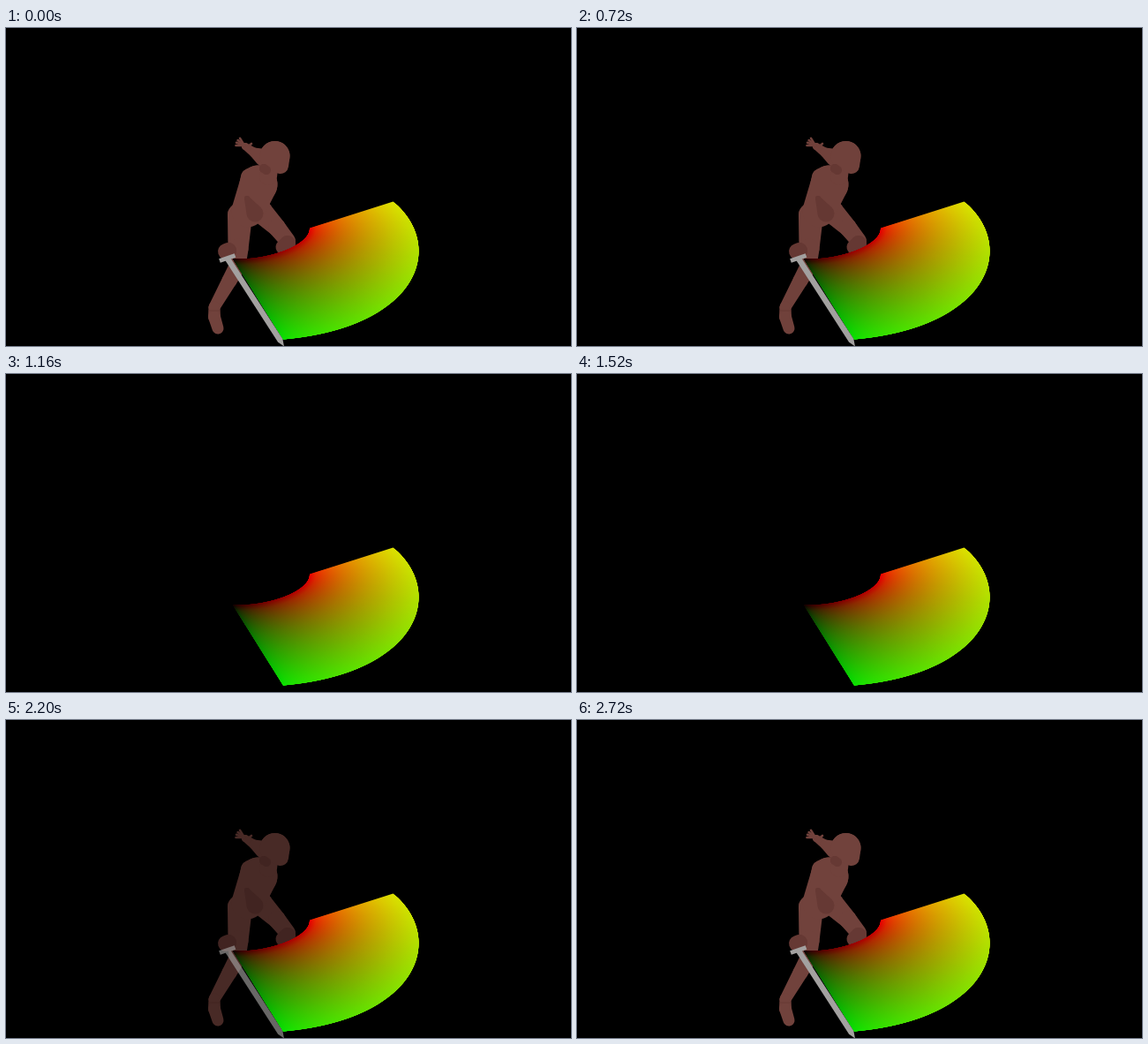
An HTML page with a canvas that plays this animation: 640 by 360 pixels, repeating every 2.76 s.

```html
<!DOCTYPE html>
<html>
<head>
<meta charset="utf-8">
<style>
html, body { margin: 0; width: 100%; height: 100%; overflow: hidden; background: #000; }
canvas { display: block; }
</style>
</head>
<body>
<canvas id="stage" width="640" height="360"></canvas>
<script>
const W = 640, H = 360, LOOP = 2760, FADE = 440;
const SKIN = '#71423c', SHADE = '#663934', STEEL = '#a3a1a0';
const ctx = document.getElementById('stage').getContext('2d');

function layer(paint) {
  const canvas = document.createElement('canvas');
  canvas.width = W;
  canvas.height = H;
  paint(canvas.getContext('2d'));
  return canvas;
}

function polygon(g, color, points) {
  g.fillStyle = color;
  g.beginPath();
  points.forEach(([x, y]) => g.lineTo(x, y));
  g.closePath();
  g.fill();
}

function line(g, color, width, from, to, cap = 'round') {
  g.strokeStyle = color;
  g.lineWidth = width;
  g.lineCap = cap;
  g.beginPath();
  g.moveTo(...from);
  g.lineTo(...to);
  g.stroke();
}

// Tapered tube through joints given as [x, y, radius].
function limb(g, color, ...joints) {
  g.fillStyle = color;
  joints.forEach(([x, y, r], i) => {
    const [px, py, pr] = joints[Math.max(0, i - 1)];
    const axis = Math.atan2(y - py, x - px);
    const spread = Math.acos((pr - r) / (Math.hypot(x - px, y - py) || 1));
    g.beginPath();
    g.arc(px, py, pr, axis + spread, axis - spread + 2 * Math.PI);
    g.arc(x, y, r, axis - spread, axis + spread);
    g.fill();
  });
}

function paintBody(g) {
  // Legs
  limb(g, SKIN, [289, 208, 13], [307, 226, 10], [319, 241, 9]);
  limb(g, SHADE, [319, 244, 9], [314, 248, 8.5]);
  limb(g, SKIN, [265, 212, 14], [263, 250, 11.5], [262, 270, 9.5], [253, 286, 8.5],
    [236, 316, 6.5], [236, 327, 7], [240, 340, 6.5]);
  line(g, SHADE, 0.8, [230, 320], [242, 320]);

  // Torso
  limb(g, SKIN, [276, 169, 10], [286, 177, 21.5], [274, 207, 18.5]);
  limb(g, SKIN, [299, 160, 9], [297, 168, 10]);
  limb(g, SHADE, [273, 193, 3], [282, 210, 9.5]);

  // Raised arm with spread fingers
  limb(g, SKIN, [271, 134, 4], [281, 141, 5.5], [292, 147, 10]);
  for (let i = 0; i < 4; i++) {
    const angle = Math.PI + i * 0.34;
    line(g, SKIN, 2.6, [270, 133], [270 + 9.5 * Math.cos(angle), 133 + 9.5 * Math.sin(angle)]);
  }
  line(g, SKIN, 2.6, [273, 135], [278, 131]);

  // Head, jaw shadow, gripping fist
  limb(g, SKIN, [304.5, 145, 17], [311, 156, 9]);
  limb(g, SHADE, [292, 159, 5], [295, 161, 5]);
  limb(g, SHADE, [252, 252, 9], [249, 253, 9]);
}

function paintSword(g) {
  const hilt = [250.5, 260.5], tip = [315, 360.5];
  const dx = tip[0] - hilt[0], dy = tip[1] - hilt[1];
  g.save();
  g.translate(...hilt);
  g.rotate(Math.atan2(dy, dx));
  const length = Math.hypot(dx, dy), half = 3.2;
  polygon(g, STEEL, [[0, -half], [length - 8, -half], [length, 0], [length - 8, half], [0, half]]);
  g.restore();
  line(g, STEEL, 5, [242, 263.5], [259.5, 257.5], 'butt');
}

function bezier(p, t) {
  const s = 1 - t;
  const w = [s * s * s, 3 * s * s * t, 3 * s * t * t, t * t * t];
  return [0, 1].map(k => w.reduce((sum, wi, i) => sum + wi * p[i][k], 0));
}

const INNER = [[344, 226.5], [345, 245], [300, 263], [257, 261.5]];
const OUTER = [[438.5, 196.5], [499, 247], [468, 339], [314, 352.5]];

// Red follows the sweep, green follows the radius.
function paintTrail(g) {
  const strips = 160, stops = 14;
  for (let i = 0; i < strips; i++) {
    const t0 = i / strips, t1 = Math.min(1, (i + 6) / strips);
    const a = bezier(INNER, t0), b = bezier(OUTER, t0);
    const c = bezier(OUTER, t1), d = bezier(INNER, t1);
    const sweep = Math.pow(1 - (i + 0.5) / strips, 0.56);
    const fill = g.createLinearGradient(...a, ...b);
    for (let k = 0; k <= stops; k++) {
      const v = k / stops;
      const red = Math.round((238 - 18 * v) * sweep);
      const green = Math.round(226 * Math.pow(v, 0.64));
      fill.addColorStop(v, `rgb(${red},${green},0)`);
    }
    polygon(g, fill, [a, b, c, d]);
  }
}

const body = layer(paintBody), trail = layer(paintTrail), sword = layer(paintSword);
const clamp = x => Math.max(0, Math.min(1, x));

// The figure fades out and back in, symmetric about the middle of its absence.
function figureAlpha(ms) {
  return clamp((Math.abs(ms - 1540) - 380) / FADE);
}

function draw(ms) {
  const alpha = figureAlpha(ms);
  ctx.clearRect(0, 0, W, H);
  ctx.globalAlpha = alpha;
  ctx.drawImage(body, 0, 0);
  ctx.globalAlpha = 1;
  ctx.drawImage(trail, 0, 0);
  ctx.globalAlpha = alpha;
  ctx.drawImage(sword, 0, 0);
}

const start = performance.now();
function tick() {
  draw((performance.now() - start) % LOOP);
  requestAnimationFrame(tick);
}
tick();
</script>
</body>
</html>
```
